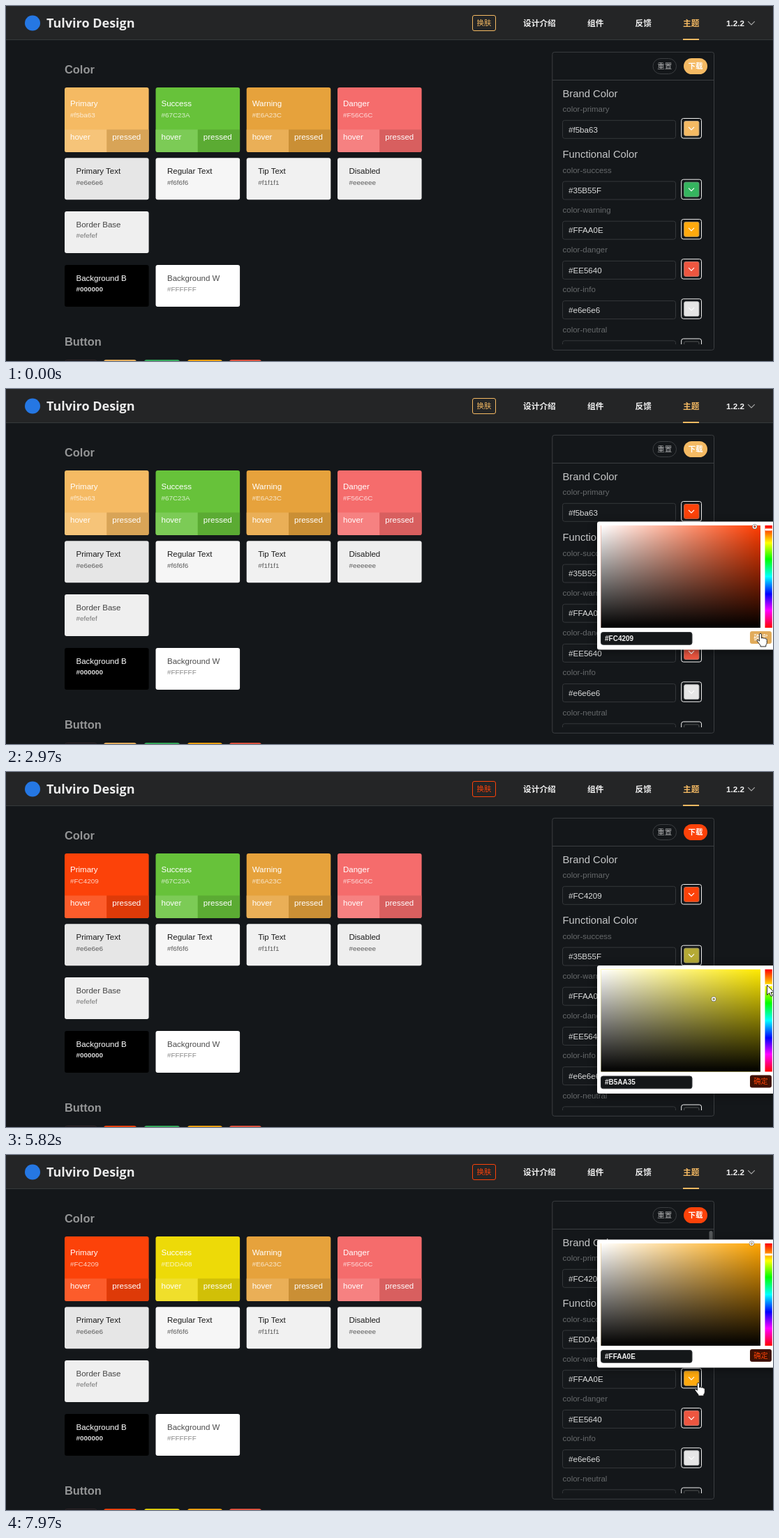
An HTML page that plays this animation: 1099 px wide and 510 px high, repeating every 8 s.

```html
<!DOCTYPE html>
<html lang="zh">
<head>
<meta charset="utf-8">
<title>Theme editor</title>
<style>
html, body { margin: 0; width: 100%; height: 100%; overflow: hidden; background: #14171a; }
svg { display: block; width: 1099px; height: 510px; font-family: "Liberation Sans", Arial, "Noto Sans CJK SC", "Noto Sans CJK", sans-serif; }
.shadow { filter: drop-shadow(0 2px 6px rgba(0, 0, 0, .5)); }
</style>
</head>
<body>
<svg viewBox="0 0 1099 510">
  <defs>
    <linearGradient id="white"><stop stop-color="#fff"/><stop offset="1" stop-color="#fff" stop-opacity="0"/></linearGradient>
    <linearGradient id="black" x2="0" y2="1"><stop stop-opacity="0"/><stop offset="1"/></linearGradient>
    <linearGradient id="hues" x2="0" y2="1">
      <stop stop-color="#f00"/><stop offset=".17" stop-color="#ff0"/><stop offset=".33" stop-color="#0f0"/>
      <stop offset=".5" stop-color="#0ff"/><stop offset=".67" stop-color="#00f"/><stop offset=".83" stop-color="#f0f"/>
      <stop offset="1" stop-color="#f00"/>
    </linearGradient>
    <clipPath id="list"><path d="M783 107h232v379h-232z"/></clipPath>
  </defs>
  <g id="page"></g>
  <g id="live"></g>
</svg>
<script>
const LOOP = 8000, FIRST = 180, STEP = 69.5;
const ORANGE = '#f5ba63', RED = '#FC4209', GREEN = '#35B55F', YELLOW = '#EDDA08', AMBER = '#FFAA0E';
const CARD_X = [84, 214.5, 344.7, 475];
const BG = '#14171a', LINE = '#34373a';

const clamp = (v, a = 0, b = 1) => Math.min(b, Math.max(a, v));
const lerp = (a, b, p) => a + (b - a) * p;
const ramp = (t, a, b) => clamp((t - a) / (b - a));
const smooth = p => p * p * (3 - 2 * p);
const easeOut = p => 1 - (1 - p) ** 5;

const rgb = hex => [1, 3, 5].map(i => parseInt(hex.slice(i, i + 2), 16));
const toHex = c => '#' + c.map(v => Math.round(v).toString(16).padStart(2, '0')).join('').toUpperCase();
const mix = (a, b, p) => { const B = rgb(b); return toHex(rgb(a).map((v, i) => lerp(v, B[i], p))); };

function toHsv(hex) {
  const [r, g, b] = rgb(hex), max = Math.max(r, g, b), d = max - Math.min(r, g, b);
  const h = max === r ? (g - b) / d : max === g ? 2 + (b - r) / d : 4 + (r - g) / d;
  return [(h + 6) % 6 * 60, d / max, max / 255];
}
function fromHsv([h, s, v]) {
  const f = n => { const k = (n + h / 60) % 6; return 255 * (v - v * s * clamp(Math.min(k, 4 - k))); };
  return toHex([f(5), f(3), f(1)]);
}

const rect = (x, y, w, h, fill, r = 0, more = '') =>
  `<rect x="${x}" y="${y}" width="${w}" height="${h}" rx="${r}" fill="${fill}" ${more}/>`;
const box = (x, y, w, h, stroke, r, fill = 'none') => rect(x, y, w, h, fill, r, `stroke="${stroke}"`);
const text = (x, y, size, fill, s, more = '') =>
  `<text x="${x}" y="${y}" font-size="${size}" fill="${fill}" ${more}>${s}</text>`;
const BOLD = 'font-weight="700"', MID = 'text-anchor="middle"';
const chevron = (x, y, w, stroke) =>
  `<path d="M${x - w} ${y - w / 2}l${w} ${w}l${w} ${-w}" fill="none" stroke="${stroke}" stroke-width="1.1"/>`;

function plainCard(x, y, fill, name, hex, ink, sub, more = '') {
  return rect(x, y, 120.6, 60, fill, 3) + text(x + 16.5, y + 23, 11.5, ink, name) +
    text(x + 16.5, y + 38.3, 9.9, sub, hex, more);
}

function colorCard(x, name, hex, fill = hex) {
  return rect(x, 117, 120.6, 93, fill, 3) +
    `<path d="M${x} 177.5h60.3v32.5h-57.3q-3 0-3-3z" fill="${mix(fill, '#ffffff', .14)}"/>` +
    `<path d="M${x + 60.3} 177.5h60.3v29.5q0 3-3 3h-57.3z" fill="${mix(fill, '#000000', .12)}"/>` +
    text(x + 8, 144, 11.5, '#fff', name) + text(x + 8, 159.5, 9.9, '#fff', hex, 'opacity=".75"') +
    text(x + 8, 192, 11.5, '#fff', 'hover') + text(x + 68.3, 192, 11.5, '#fff', 'pressed');
}

function field(i, label, hex, swatch) {
  const y = i ? 194.5 + i * 57.2 : 164;
  return text(797.5, y - 12, 11.5, '#66696b', label) + box(797.5, y + .3, 162, 26, LINE, 3, '#15181b') +
    text(806, y + 17.5, 11.6, '#dcdddd', hex) + box(967.7, y - 2.5, 28.8, 28.5, '#f0f0f0', 3) +
    box(971.7, y + 1.5, 21.2, 20.8, mix(swatch, '#999999', .45), 2, swatch) +
    chevron(982, y + 12, 4, '#fff');
}

const button = (x, w, fill) => rect(x, 508.3, w, 12, fill, 3);

function drawPage() {
  const nav = [[741, '设计介绍'], [833, '组件'], [901.5, '反馈'], [970, '主题'], [1032, '1.2.2']];
  return rect(0, 0, 1099, 510, BG) + rect(0, 0, 1099, 48, '#242526') + rect(0, 48, 1099, 1, '#36393b') +
    '<circle cx="38" cy="24.5" r="11" fill="#2577e3"/>' +
    text(58, 31, 18, '#ececec', 'Tulviro Design', BOLD + ' font-family="Open Sans, Noto Sans, sans-serif"') +
    nav.map(([x, s]) => text(x, 28.5, 11.7, s === '主题' ? ORANGE : '#f2f2f2', s, BOLD)).join('') +
    rect(970, 47, 23, 2, ORANGE) + chevron(1068, 24.5, 4.8, '#aaa') +
    text(84, 96.5, 16.4, '#949596', 'Color', BOLD) + text(84, 488, 16.4, '#949596', 'Button', BOLD) +
    colorCard(CARD_X[2], 'Warning', '#E6A23C') + colorCard(CARD_X[3], 'Danger', '#F56C6C') +
    ['Primary Text#e6e6e6', 'Regular Text#f6f6f6', 'Tip Text#f1f1f1', 'Disabled#eeeeee'].map((s, i) => {
      const [name, hex] = s.split('#');
      return plainCard(CARD_X[i], 218.3, '#' + hex, name, '#' + hex, '#1c1c1c', '#5c5c5c');
    }).join('') +
    plainCard(84, 295, '#efefef', 'Border Base', '#efefef', '#444', '#777') +
    plainCard(84, 372, '#000', 'Background B', '#000000', '#fff', '#ddd', BOLD) +
    plainCard(CARD_X[1], 372, '#fff', 'Background W', '#FFFFFF', '#4c4c4c', '#888') +
    box(84.5, 508.5, 45.5, 12, '#302326', 3) + button(260, 50, AMBER) + button(320, 46, '#EE5640') +
    box(782.8, 66.3, 231.7, 428, '#3b3e41', 3) + rect(783, 106, 231, 1, '#3b3e41') +
    box(927, 75.5, 33.5, 22, '#3b3e41', 11) + text(943.8, 90.3, 10.5, '#b0b1b2', '重置', MID) +
    text(797.5, 131, 14.8, '#c6c7c8', 'Brand Color') + text(797.5, 218, 14.8, '#c6c7c8', 'Functional Color') +
    '<g clip-path="url(#list)">' + field(2, 'color-warning', AMBER, AMBER) +
    field(3, 'color-danger', '#EE5640', '#EE5640') + field(4, 'color-info', '#e6e6e6', '#e6e6e6') +
    field(5, 'color-neutral', '#14171a', BG) + '</g>';
}

// Popups: placement, open and close times, hue change, then saturation and value change.
const popups = [
  { y: 190.5, open: 1433, close: 3449, from: ORANGE, to: RED, hue: [2230, 2340], sv: [2420, 2560], hot: [2850, 3400] },
  { y: 278, open: 4270, close: 7260, from: GREEN, to: YELLOW, hue: [5220, 5800], sv: [6050, 6500], hot: [6900, 7260] },
  { y: 121.5, open: 7680, close: 9000, from: AMBER, to: AMBER, hue: [9000, 9001], sv: [9000, 9001], hot: [9000, 9001], up: true }
];

function picked(p, t) {
  const a = toHsv(p.from), b = toHsv(p.to);
  const h = smooth(ramp(t, ...p.hue)), s = smooth(ramp(t, ...p.sv));
  return [lerp(a[0], b[0], h), lerp(a[1], b[1], s), lerp(a[2], b[2], s)];
}

const shown = (p, t) => t < p.close ? easeOut(ramp(t, p.open, p.open + 300)) : 1 - easeOut(ramp(t, p.close, p.close + 300));

function drawPopup(p, t, theme) {
  const k = shown(p, t);
  if (k < .01) return '';
  const y = p.y, c = picked(p, t), hot = t >= p.hot[0] && t < p.hot[1];
  const origin = p.up ? y + 184 : y, panel = fill => rect(852.5, y + 5.5, 228.5, 147, fill);
  return `<g opacity="${k}" transform="translate(0 ${origin}) scale(1 ${k}) translate(0 ${-origin})"><g class="shadow">` +
    rect(847, y, 258, 184, '#fff', 3) + '</g>' +
    panel(fromHsv([c[0], 1, 1])) + panel('url(#white)') + panel('url(#black)') +
    `<circle cx="${852.5 + 228.5 * c[1]}" cy="${y + 5.5 + 147 * (1 - c[2])}" r="2.4" fill="none" stroke="#555" stroke-width="2.4"/>` +
    `<circle cx="${852.5 + 228.5 * c[1]}" cy="${y + 5.5 + 147 * (1 - c[2])}" r="2.4" fill="none" stroke="#fff" stroke-width="1.4"/>` +
    rect(1087.5, y + 5.5, 10.3, 147, 'url(#hues)') +
    rect(1087.5, y + 4.2 + 147 * c[0] / 360, 10.3, 3, '#fff', 1) +
    box(852.5, y + 159, 130.5, 17.8, LINE, 3, '#141719') +
    text(858, y + 171.3, 10, '#f0f0f0', fromHsv(c), BOLD) +
    rect(1066, y + 157.5, 31, 18, hot ? mix(theme, '#000000', .08) : mix(theme, '#000000', .75), 3) +
    text(1081.5, y + 170.3, 10.3, hot ? '#fff' : theme, '确定', MID) + '</g>';
}

const path = [
  [180, 1064, 500], [500, 1005, 385], [800, 930, 240], [950, 934, 215], [1180, 976, 186], [1580, 976, 186],
  [1850, 1050, 198], [2126, 1091, 206], [2250, 1091, 202], [2450, 1074, 198], [2580, 1073, 199], [2900, 1081, 351],
  [3400, 1081, 351], [3516, 1047, 320], [3720, 1008, 288], [3950, 981, 263], [4320, 981, 263], [4566, 1060, 318],
  [4950, 1091, 340], [5220, 1091, 341], [5800, 1091, 306], [5960, 1040, 318], [6050, 1014, 326], [6500, 1073, 294],
  [6600, 1073, 294], [6950, 1078, 434], [7136, 1079, 436], [7270, 1079, 436], [7590, 988, 322], [7964, 992, 327], [8000, 992, 327]
];
const hands = [[1150, 1640], [2850, 3449], [3900, 4390], [6900, 7330], [7550, 8001]];

function pointer(t) {
  const i = Math.max(1, path.findIndex(k => k[0] > t)), a = path[i - 1], b = path[i], p = smooth(ramp(t, a[0], b[0]));
  return [lerp(a[1], b[1], p), lerp(a[2], b[2], p)];
}

function drawPointer(t, x, y) {
  const hand = hands.some(([a, b]) => t >= a && t < b);
  const d = hand
    ? 'M-1.6 1.2Q0-1 1.6 1.2V7q1.5-1.4 2.8.2q1.6-1.1 2.7.6q2-.6 2.2 1.6v4q0 2-1.5 3.5V19H0v-1.6L-4.8 11q-.7-2 1.2-1.8l2 2z'
    : 'M0 0V14.2L3.2 11.2 5.5 16.2 7.8 15.2 5.5 10.4H10z';
  return `<path transform="translate(${x} ${y})" d="${d}" fill="#fff" stroke="#111" stroke-width=".9" stroke-linejoin="round"/>`;
}

function drawLive(t) {
  const theme = mix(ORANGE, RED, ramp(t, 3330, 3580));
  const primary = t < 3330 ? ORANGE : RED, success = t < 7230 ? GREEN : YELLOW;
  const [x, y] = pointer(t);
  const covered = popups.some(p => t > p.open && t < p.close && x > 847 && y > p.y && y < p.y + 184);
  const scrolling = t >= FIRST && x > 783 && x < 1014 && y > 66 && y < 494 && !covered;
  return box(668.5, 13.5, 33, 22, theme, 2.5) + text(685, 28, 10.4, theme, '换肤', MID) +
    rect(971, 75, 34, 23, theme, 11.5) + text(988, 90.3, 10.5, '#fff', '下载', MID + ' ' + BOLD) +
    colorCard(CARD_X[0], 'Primary', t < 3330 ? ORANGE : RED) +
    colorCard(CARD_X[1], 'Success', t < 7230 ? '#67C23A' : YELLOW) +
    button(140, 47, theme) + button(198, 51, mix(GREEN, YELLOW, ramp(t, 7230, 7480))) +
    field(0, 'color-primary', primary, fromHsv(picked(popups[0], t))) +
    field(1, 'color-success', success, fromHsv(picked(popups[1], t))) +
    (scrolling ? rect(1007.5, 109, 5.2, 137, '#55585a', 2.6) : '') +
    popups.map(p => drawPopup(p, t, theme)).join('') +
    (t >= FIRST ? drawPointer(t, x, y) : '');
}

const live = document.getElementById('live');
document.getElementById('page').innerHTML = drawPage();
let last = -1;

function frame() {
  const t = performance.now() % LOOP;
  const now = t < FIRST ? 0 : FIRST + Math.floor((t - FIRST) / STEP) * STEP;
  if (now !== last) live.innerHTML = drawLive(last = now);
  requestAnimationFrame(frame);
}
frame();
</script>
</body>
</html>
```
